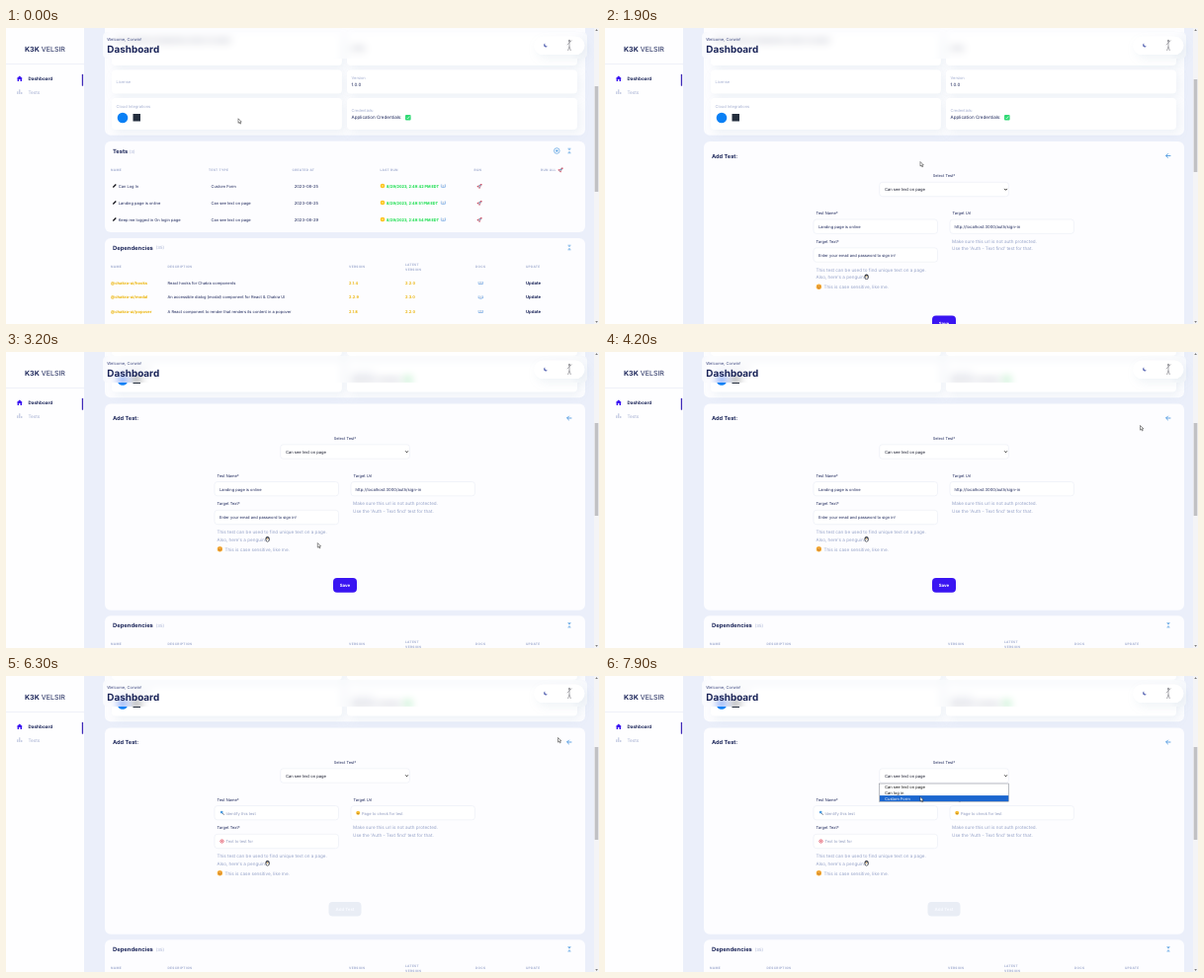
Recreate the animation shown at these times as an HTML page. Size 600 by 300 pixels, loop 8 s.

```html
<!DOCTYPE html>
<html lang="en">
<head>
<meta charset="utf-8">
<title>Dashboard</title>
<style>
html, body { margin: 0; width: 100%; height: 100%; overflow: hidden; background: #ebeffa; }
svg { position: absolute; left: 0; top: 0; width: 600px; height: 300px; }
text { font-family: Inter, Roboto, sans-serif; text-rendering: geometricPrecision; }
.card { filter: drop-shadow(3px 4px 5px rgba(112, 144, 176, .1)); }
</style>
</head>
<body>
<svg id="stage" viewBox="0 0 600 300"></svg>
<script>
const NAVY = '#1b2559', GREY = '#a3aed0', BLUE = '#3a15f2', LINK = '#3a8fdc', GOLD = '#ecb50c', GREEN = '#08dc40';
const SCROLL = 62.5, FORM_GAP = 116.8, LOOP = 8000;
const FONT_SCALE = .91;

const text = (x, y, s, size = 4.4, fill = NAVY, weight = 400, more = '') =>
  `<text x="${x}" y="${y}" font-size="${size * FONT_SCALE}" fill="${fill}" font-weight="${weight}" ${more}>${s}</text>`;
const bold = (x, y, s, size, fill) => text(x, y, s, size, fill, 700);
const middle = (x, y, s, size, fill, weight) => text(x, y, s, size, fill, weight, 'text-anchor="middle"');
const head = (x, y, s) => text(x, y, s, 3.5, GREY, 700, 'letter-spacing=".3"');
const rect = (x, y, w, h, r, fill, more = '') =>
  `<rect x="${x}" y="${y}" width="${w}" height="${h}" rx="${r}" fill="${fill}" ${more}/>`;
const dot = (x, y, r, fill) => `<circle cx="${x}" cy="${y}" r="${r}" fill="${fill}"/>`;
const line = (d, stroke, w = .8) => `<path d="${d}" fill="none" stroke="${stroke}" stroke-width="${w}"/>`;
const fillPath = (d, fill) => `<path d="${d}" fill="${fill}"/>`;
const at = (x, y, s) => `<g transform="translate(${x} ${y})">${s}</g>`;
const group = (id, s) => `<g id="${id}">${s}</g>`;
const panel = (y, h) => rect(100, y, 486, h, 6, '#fdfdff');
const card = (x, y, h) => rect(x, y, 233, h, 4, '#fff', 'class="card"');
const field = (x, y, w) => rect(x, y, w, 14.4, 3, '#fff', 'stroke="#e9ecf5" stroke-width=".6"');

const pencil = (x, y) => at(x, y, line('M-1.5 1.5 1.5 -1.5', '#15151c', 1.3));
const book = (x, y) => at(x, y,
  fillPath('M-2.5-1.4 0-.8 2.5-1.4V1.3L0 1.8-2.5 1.3z', '#5c9ae2') +
  fillPath('M-2.1-1.6 0-.9 2.1-1.6V.8L0 1.3-2.1 .8z', '#e6edf6') + line('M0-1V1.2', '#8698b8', .3));
const rocket = (x, y) => at(x, y, `<g transform="rotate(45)">` +
  fillPath('M-2 2.4-.8-.4H.8L2 2.4z', '#d8324c') +
  `<ellipse rx="1" ry="2.5" fill="#b9bfcc"/>` + fillPath('M-1-1.2Q0-4.4 1-1.2z', '#d8324c') +
  dot(0, -.3, .5, '#3b6ea8') + '</g>');
const collapse = (x, y) => at(x, y, line('M-1.6-2.3H1.6M-1.6 2.3H1.6', LINK, .5) +
  fillPath('M-1-1.7H1L0-.4zM-1 1.7H1L0 .4z', LINK));

function overview() {
  return panel(-60, 168.7) +
    card(107, 5, 33) + card(345, 5, 33) + card(107, 42.5, 24) + card(345, 42.5, 24) +
    card(107, 71, 32) + card(345, 71, 32) +
    text(111.5, 14, 'End to end tests and dependency checks in one place', 5) + text(349.5, 22, 'Online', 5) +
    text(111.5, 56.2, 'License', 4.4, GREY) +
    text(349.5, 52.2, 'Version', 4.4, GREY) + text(349.5, 59.2, '1.0.0', 5) +
    text(111.5, 80.7, 'Cloud Integrations', 4.4, GREY) +
    dot(118, 91, 5.3, '#0a80f5') + rect(128.5, 87, 7.5, 7.5, 0, '#252f3e') +
    text(349.5, 85.2, 'Credentials:', 4.4, GREY) + text(349.5, 92.4, 'Application Credentials:', 5) +
    rect(404, 88, 5.6, 5.6, 1, '#2fda74') + line('M405.4 90.9 406.5 92 408.3 89.5', '#fff', .6);
}

function tests() {
  const rows = [
    ['Can Log In', 'Custom Form', '25', '42'],
    ['Landing page is online', 'Can see text on page', '25', '51'],
    ['Keep me logged in On login page', 'Can see text on page', '29', '54']];
  const heads = [[106, 'NAME'], [205, 'TEST TYPE'], [289.5, 'CREATED AT'], [378.5, 'LAST RUN'], [473.5, 'RUN'], [541, 'RUN ALL']];
  return panel(114.7, 92.3) + bold(108, 126.8, 'Tests', 6.3) + text(124.7, 126.6, '(3)', 4.7, GREY) +
    `<circle cx="557.3" cy="124.5" r="2.8" fill="none" stroke="${LINK}" stroke-width=".6"/>` +
    line('M555.8 124.5H558.8M557.3 123V126', LINK, .6) + collapse(570, 124.5) +
    heads.map(([x, s]) => head(x, 144.8, s)).join('') + rocket(561.5, 143.5) +
    rows.map(([name, type, day, sec], i) => at(0, 17 * i,
      pencil(109.8, 160) + text(113.8, 161.6, name) + text(207.5, 161.6, type) +
      text(291.7, 161.6, '2023-08-' + day, 4.6) + dot(381, 160, 2.3, '#fdbf1c') + dot(381, 160, 1.3, '#ffd84d') +
      bold(385, 161.6, `8/29/2023, 2:49:${sec} PM EDT`, 4.25, GREEN) +
      book(442.4, 160) + rocket(479.5, 160))).join('');
}

function deps() {
  const rows = [
    [259.8, '@chakra-ui/hooks', '2.1.4', '2.2.0', 'React hooks for Chakra components'],
    [274.3, '@chakra-ui/modal', '2.2.9', '2.3.0', 'An accessible dialog (modal) component for React &amp; Chakra UI'],
    [288.8, '@chakra-ui/popover', '2.1.8', '2.2.0', 'A React component to render that renders its content in a popover'],
    [306.2, '@chakra-ui/portal', '2.0.10', '2.1.0', 'React component used to render children outside the DOM hierarchy of the parent', 'component'],
    [323.8, '@chakra-ui/system', '2.3.3', '2.6.0', 'Chakra UI system primitives'],
    [338.3, '@chakra-ui/tooltip', '2.2.6', '2.3.0', 'A React Component for rendering dynamically positioned Tooltips'],
    [352.7, '@emotion/react', '11.10.5', '11.11.1', '&gt; Simple styling in React.']];
  const heads = [[106, 'NAME'], [163.5, 'DESCRIPTION'], [347, 'VERSION'], [475, 'DOCS'], [526, 'UPDATE']];
  return panel(213, 260) + bold(108, 224.6, 'Dependencies', 6.4) + text(151.7, 224.4, '(35)', 4.7, GREY) + collapse(570, 222.5) +
    heads.map(([x, s]) => head(x, 243, s)).join('') + head(404, 240.8, 'LATEST') + head(404, 246, 'VERSION') +
    rows.map(([y, name, now, next, about, rest]) =>
      bold(106, y, name, 4.5, GOLD) + text(163.5, rest ? y - 3 : y, about) + (rest ? text(163.5, y + 3.2, rest) : '') +
      bold(347, y, now, 4.3, GOLD) + bold(404, y, next, 4.3, GOLD) + book(480.3, y - 1.5) + bold(526, y, 'Update', 4.7)).join('');
}

// Laid out for the scrolled page, then shifted down.
function form() {
  const hint = '#96a3c8', holder = '#8f9abf';
  const saved = text(216, 140.5, 'Landing page is online') +
    text(353.5, 140.5, 'http://localhost:3000/auth/sign-in', 4.6) +
    text(216, 169.2, 'Enter your email and password to sign in!') +
    rect(331, 229, 24, 14.8, 4, BLUE) + middle(343, 238, 'Save', 4.8, '#fff', 700);
  const blank = dot(218.2, 138.1, 1.4, '#4b9be0') + line('M219.2 139.2 220.6 140.7', '#39465f', .8) +
    text(222.5, 140.5, 'Identify this test', 4.4, holder) +
    dot(356.2, 138.7, 2, '#f8bd32') + line('M355.2 139.2Q356.2 140.4 357.2 139.2', '#7c4b14', .5) +
    text(360, 140.5, 'Page to check for test', 4.4, holder) +
    dot(218.5, 167.6, 2, '#df4458') + dot(218.5, 167.6, 1.3, '#fff') + dot(218.5, 167.6, .7, '#df4458') +
    text(222.5, 169.2, 'Text to test for', 4.4, holder) +
    rect(326.5, 229, 33, 14.6, 4, '#e9edf5') + middle(343, 238, 'Add Test', 4.8, '#f8faff', 700);
  const options = ['Can see text on page', 'Can log in', 'Custom Form'];
  const menu = rect(277.7, 109, 130.8, 18.2, 0, '#fff', 'stroke="#777d88" stroke-width=".5"') +
    options.map((s, i) => rect(278, 109.2 + 5.95 * i, 130.2, 5.95, 0, '#1b66cf', `id="pick${i}"`) +
      text(283, 113.8 + 5.95 * i, s, 4.5, '#111', 400, `id="opt${i}"`)).join('');
  return at(0, SCROLL, panel(52.4, 209.4) + bold(108, 69, 'Add Test:', 6.2) +
    line('M572.4 67H567.6M569.8 64.8 567.6 67 569.8 69.2', LINK, .8) +
    middle(343, 88.8, 'Select Test*', 4.3) + field(277.7, 93.8, 130.8) +
    text(283, 102.7, 'Can see text on page', 4.5, '#15182a') + line('M404.2 100.4 405.5 101.8 406.8 100.4', '#111', .9) +
    text(213.5, 126.7, 'Test Name*', 4.4) + field(211, 131.5, 125.5) +
    text(351.5, 126.7, 'Target Url', 4.4) + field(349, 131.5, 125.5) +
    text(213.5, 155.3, 'Target Text*', 4.4) + field(211, 160.3, 125.5) +
    text(351, 155.4, 'Make sure this url is not auth protected.', 5.06, hint) +
    text(351, 162.7, "Use the 'Auth - Text find' test for that.", 5.06, hint) +
    text(213.5, 184.3, 'This test can be used to find unique text on a page.', 5.06, hint) +
    text(213.5, 191.6, "Also, here's a penguin.", 5.06, hint) +
    `<ellipse cx="264.6" cy="189.8" rx="2.1" ry="2.7" fill="#2c303a"/><ellipse cx="264.6" cy="190.2" rx="1.2" ry="1.9" fill="#f3f4f7"/>` +
    dot(264.6, 189.2, .5, '#f0a020') +
    dot(216.4, 199.7, 2.7, '#f9ae3a') + line('M215 200.2Q216.4 202 217.8 200.2M215 199H215.8M217 199H217.8', '#80401c', .5) +
    text(221.5, 201.6, 'This is case sensitive, like me.', 5.06, hint) +
    group('saved', saved) + group('blank', blank) + group('menu', menu));
}

// Frosted strip: a blurred copy of the page, clipped to the title bar.
const frost = `<defs>
    <clipPath id="strip">${rect(98, 4, 490, 27, 5, '#fff')}</clipPath>
    <filter id="soft" filterUnits="userSpaceOnUse" x="80" y="-20" width="520" height="75"><feGaussianBlur stdDeviation="4.5"/></filter>
  </defs>
  <g clip-path="url(#strip)">${rect(98, 4, 490, 27, 0, '#f6f8fd')}
    <g filter="url(#soft)">${rect(80, -20, 520, 75, 0, '#f6f8fd')}<use href="#view"/></g></g>`;

const titleBar = text(102.3, 12.6, 'Welcome, Corwin!', 4.5, '#3f4a80') + bold(102.3, 24.9, 'Dashboard', 10.9) +
  rect(534, 8.5, 51.5, 18.6, 9.3, '#fff', 'class="card"') +
  fillPath('M545.3 15.6A2 2 0 1 0 547.8 18.5 2.3 2.3 0 0 1 545.3 15.6z', '#5e6bb5') +
  dot(570, 13, 1.2, '#a1a1a6') +
  line('M570 14V18.5L568.6 23M570 18.5 571.4 23M570 15 567.8 17M570 15 572.3 12.5', '#a1a1a6', .9);

const sidebar = rect(0, 0, 79, 300, 0, '#fefeff') +
  text(19, 24, '<tspan font-weight="700">K3K</tspan> VELSIR', 7.8) +
  line('M0 36.5H79', '#eaecf5', .7) +
  fillPath('M10.7 51.3 13.8 48.5 16.9 51.3H16V54H14.5V52H13.1V54H11.6V51.3z', BLUE) +
  bold(22.5, 53, 'Dashboard', 5.1) + rect(76.8, 46.8, 1.3, 12, .6, '#3d2ab8') +
  line('M11.8 67V64.3M13.8 67V62.3M15.8 67V65', '#b4bddb', 1) + text(22.5, 66.5, 'Tests', 5.1, GREY);

const scrollbar = rect(595, 0, 5, 300, 0, '#f4f4f6') + rect(595.7, 0, 3.6, 94, 0, '#c1c1c4', 'id="thumb"') +
  fillPath('M596.3 2.8H598.9L597.6 1.2zM596.3 297.2H598.9L597.6 298.8z', '#555');

document.getElementById('stage').innerHTML = rect(0, 0, 600, 300, 0, '#ebeffa') +
  group('view', overview() + group('list', tests()) + group('editor', form()) + group('packages', deps())) +
  frost + titleBar + sidebar + scrollbar +
  group('cursor', `<path d="M0 0V4.6L1.1 3.6 1.9 5.4 2.7 5 1.9 3.3H3.3z" fill="#fff" stroke="#222" stroke-width=".5"/>`);

// Pointer stops: time, x, y
const path = [
  [0, 235, 91.8], [200, 222, 108], [700, 111, 174], [1200, 110, 175.5], [1700, 300, 142], [1900, 319, 135.5],
  [2200, 355.5, 141], [2700, 388, 139], [3050, 296, 166], [3400, 345, 236], [3700, 362, 166],
  [4200, 541.5, 74.5], [4500, 563, 66], [4700, 568.5, 66], [5000, 568.5, 66], [5300, 556.5, 62.5],
  [5700, 556.5, 62.5], [6300, 558.5, 62.5], [6700, 400, 134], [7000, 290, 194], [7300, 322, 134],
  [7500, 329, 100], [7600, 329, 101], [7900, 319, 122.5], [8000, 319, 122.5]];
const ease = k => k * k * (3 - 2 * k);
const show = (id, on) => document.getElementById(id).setAttribute('display', on ? 'inline' : 'none');
const move = (id, x, y) => document.getElementById(id).setAttribute('transform', `translate(${x} ${y})`);

function pointer(t) {
  const i = path.findIndex(p => p[0] > t), [t0, x0, y0] = path[i - 1], [t1, x1, y1] = path[i];
  const k = ease((t - t0) / (t1 - t0));
  return [x0 + (x1 - x0) * k, y0 + (y1 - y0) * k];
}

function draw(t) {
  const [x, y] = pointer(t);
  const editing = t >= 1200 && t < 4700 || t >= 5700;
  const scroll = ease(Math.min(1, Math.max(0, (t - 1900) / 300)));
  move('cursor', x, y);
  move('view', 0, -SCROLL * scroll);
  move('packages', 0, editing ? FORM_GAP : 0);
  show('list', !editing);
  show('editor', editing);
  show('saved', t < 5000);
  show('blank', t >= 5000);
  show('menu', t >= 7600);
  const picked = y > 121 ? 2 : y > 115 ? 1 : 0;
  for (let i = 0; i < 3; i++) {
    show('pick' + i, i === picked);
    document.getElementById('opt' + i).setAttribute('fill', i === picked ? '#fff' : '#111');
  }
  const thumb = document.getElementById('thumb');
  thumb.setAttribute('y', editing ? 52 + 20 * scroll : 59 + 22.5 * scroll);
  thumb.setAttribute('height', editing ? 94 : 107);
}

const start = performance.now();
let last = -1;
(function tick() {
  const t = Math.floor((performance.now() - start) % LOOP / 100) * 100;
  if (t !== last) draw(last = t);
  requestAnimationFrame(tick);
})();
</script>
</body>
</html>
```
